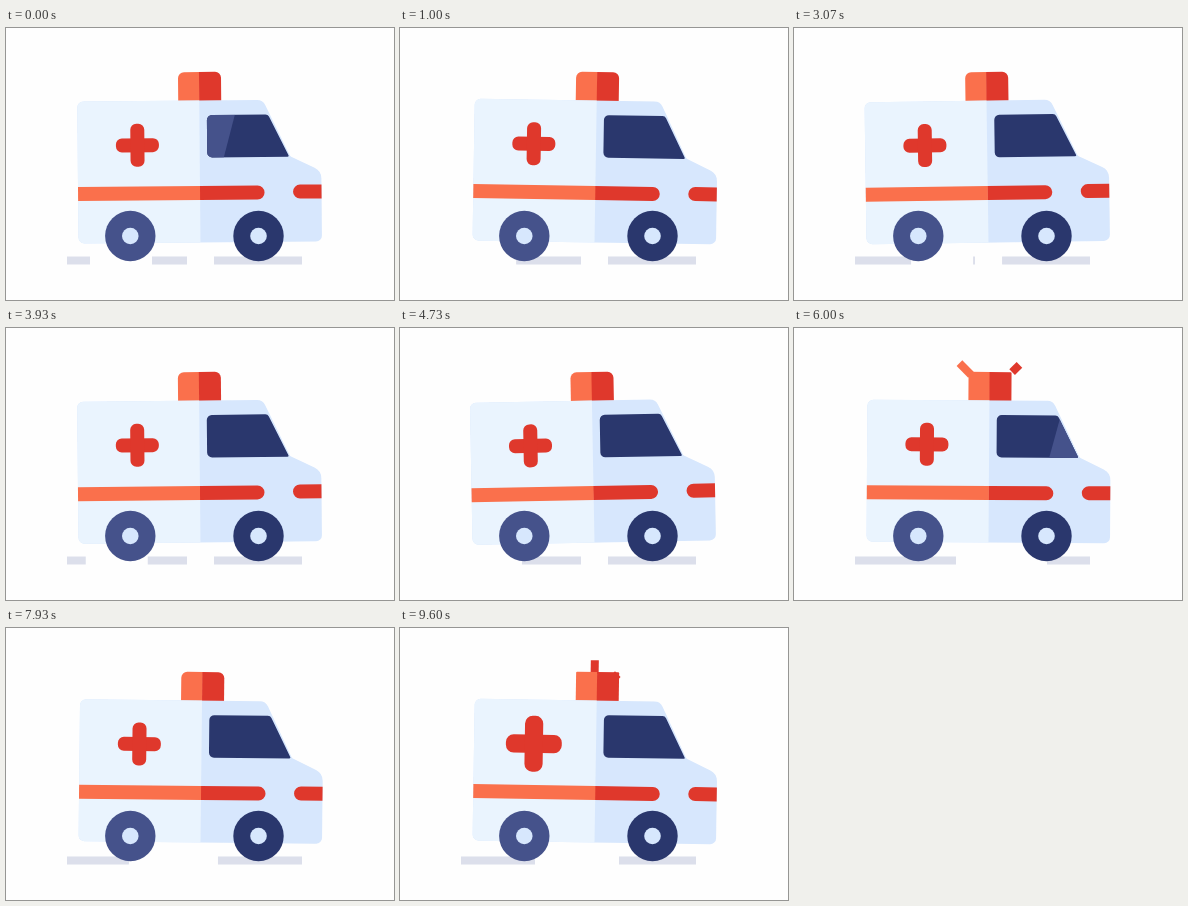
Write an HTML page with a canvas that moves like this. It is 388 px wide and 272 px high and loops after 9.74 s.

```html
<!DOCTYPE html>
<html lang="en">
<head>
<meta charset="utf-8">
<title>Ambulance</title>
<style>
html, body { margin: 0; width: 100%; height: 100%; overflow: hidden; background: #fefefe; }
canvas { display: block; }
</style>
</head>
<body>
<canvas id="stage" width="388" height="272"></canvas>
<script>
const ctx = document.getElementById('stage').getContext('2d');
const LOOP = 9740, LAST_STEP = 144, TAU = Math.PI * 2;
const RED = '#df382c', ORANGE = '#fa704c', NAVY = '#2a376d', SLATE = '#45528b';
const PALE = '#eaf4fe', BLUE = '#d7e7fd', ROAD = '#dcdfeb';

const BURSTS = [2.2, 5.65, 9.48];
const PULSES = [1.75, 5.65, 9.6];
const SHINES = [0, 5.73];

// Road travel: seconds to pixels, repeating every ROAD_CYCLE pixels.
const ROAD_CYCLE = 190;
const TRAVEL = [[0, 0], [2.133, 469], [3.067, 727], [4.733, 1164], [6, 1442], [7.933, 1861], [9.6, 2229]];
const FRONT_GAP_END = [[70, 350], [89, 297], [112, 253], [139, 219], [151, 212], [157, 208]];

const clamp = (v, lo = 0, hi = 1) => Math.min(hi, Math.max(lo, v));

function along(points, t) {
  let i = 1;
  while (i < points.length - 1 && t > points[i][0]) i++;
  const [t0, v0] = points[i - 1], [t1, v1] = points[i];
  return v0 + (v1 - v0) * (t - t0) / (t1 - t0);
}

function fillBox(color, x, y, w, h, radii = 0) {
  ctx.fillStyle = color;
  ctx.beginPath();
  ctx.roundRect(x, y, w, h, radii);
  ctx.fill();
}

function disc(color, x, y, r) {
  ctx.fillStyle = color;
  ctx.beginPath();
  ctx.arc(x, y, r, 0, TAU);
  ctx.fill();
}

function polygon(points) {
  ctx.beginPath();
  points.forEach(([x, y]) => ctx.lineTo(x, y));
  ctx.closePath();
}

function roundedPath(points) {
  const [ax, ay] = points[0], [bx, by] = points[points.length - 1];
  ctx.beginPath();
  ctx.moveTo((ax + bx) / 2, (ay + by) / 2);
  points.forEach(([x, y, r], i) => {
    const [nx, ny] = points[(i + 1) % points.length];
    ctx.arcTo(x, y, nx, ny, r);
  });
  ctx.closePath();
}

function track(left, right, gapStart, gapEnd) {
  const a = clamp(gapStart, left, right), b = clamp(gapEnd, left, right);
  if (a > left) fillBox(ROAD, left, 228.5, a - left, 8);
  if (b < right) fillBox(ROAD, b, 228.5, right - b, 8);
}

function drawRoad(t) {
  const x = along(TRAVEL, t) % ROAD_CYCLE;
  let gap = 84 - x;
  if (gap < -1) gap += ROAD_CYCLE;
  track(61, 181, gap, gap + 62);
  const inGap = x > 50 && x < 157;
  track(208, 296, inGap ? 235 - 1.6 * (x - 89) : 296, inGap ? along(FRONT_GAP_END, x) : 296);
}

function ray(color, x, y, dx, dy, length, age) {
  const p = age / 0.35;
  if (p <= 0 || p >= 1) return;
  const head = length * clamp(p / 0.45), tail = length * clamp((p - 0.6) / 0.4);
  ctx.strokeStyle = color;
  ctx.lineWidth = 8;
  ctx.beginPath();
  ctx.moveTo(x + dx * tail, y + dy * tail);
  ctx.lineTo(x + dx * head, y + dy * head);
  ctx.stroke();
}

function drawSiren(t) {
  const start = BURSTS.find(s => t >= s && t < s + 0.57);
  const r = start === undefined ? 6 : 1;
  if (start !== undefined) {
    const age = t - start;
    ray(RED, 192, 46, 0, -1, 18, age);
    ray(RED, 213, 48, 0.707, -0.707, 16, age - 0.09);
    ray(ORANGE, 176, 47, -0.707, -0.707, 20, age - 0.22);
  }
  fillBox(ORANGE, 173.5, 44, 21.5, 29, [r, 0, 0, 0]);
  fillBox(RED, 194.5, 44, 22, 29, [0, r, 0, 0]);
}

function drawWindow(t) {
  ctx.save();
  roundedPath([[202, 87, 5], [263, 87, 4], [284, 129.5, 1], [202, 129.5, 5]]);
  ctx.clip();
  ctx.fillStyle = NAVY;
  ctx.fillRect(198, 84, 92, 50);
  ctx.fillStyle = SLATE;
  for (const s of SHINES) {
    if (Math.abs(t - s) > 0.6) continue;
    const edge = 230 + 300 * (t - s);
    polygon([[edge - 45, 87], [edge, 87], [edge - 11.5, 130], [edge - 56.5, 130]]);
    ctx.fill();
  }
  ctx.restore();
}

function drawCross(t) {
  const pulse = Math.max(...PULSES.map(c => Math.cos(clamp((t - c) / 0.25, -1, 1) * Math.PI / 2) ** 2));
  const s = 1 + 0.3 * pulse;
  ctx.save();
  ctx.translate(132.3, 116.7);
  ctx.scale(s, s);
  fillBox(RED, -21.5, -7, 43, 14, 6);
  fillBox(RED, -7, -21.5, 14, 43, 6);
  ctx.restore();
}

function drawBody(t) {
  const shake = 2.4 * Math.cos(TAU * ((9.6 - t) / 0.278 - 0.05)) + 0.9 * Math.cos(TAU * t / 12);
  ctx.save();
  ctx.translate(195, 215);
  ctx.rotate(shake / 165);
  ctx.translate(-195, -215);
  drawSiren(t);

  ctx.save();
  roundedPath([[72.5, 72.5, 6], [258, 72.5, 9], [285, 129, 3], [316, 144, 12], [316, 214.5, 6], [72.5, 214.5, 6]]);
  ctx.clip();
  ctx.fillStyle = BLUE;
  ctx.fillRect(66, 66, 256, 154);
  ctx.fillStyle = PALE;
  ctx.fillRect(66, 66, 128.5, 154);
  ctx.restore();

  fillBox(RED, 194, 158, 65, 14, [0, 7, 7, 0]);
  fillBox(ORANGE, 72.5, 158, 122, 14);
  fillBox(RED, 287.5, 157.5, 28.5, 14, [7, 0, 0, 7]);
  drawWindow(t);
  drawCross(t);
  ctx.restore();
}

function drawWheel(color, x) {
  disc(color, x, 208, 25.2);
  disc(BLUE, x, 208, 8.3);
}

function draw(now) {
  const step = Math.min(LAST_STEP, Math.floor((now % LOOP) * 0.015 + 0.06));
  const t = step / 15;
  ctx.fillStyle = '#fefefe';
  ctx.fillRect(0, 0, 388, 272);
  drawRoad(t);
  drawBody(t);
  drawWheel(SLATE, 124.3);
  drawWheel(NAVY, 252.5);
}

const begin = performance.now();
function tick() {
  draw(performance.now() - begin);
  requestAnimationFrame(tick);
}
tick();
</script>
</body>
</html>
```
